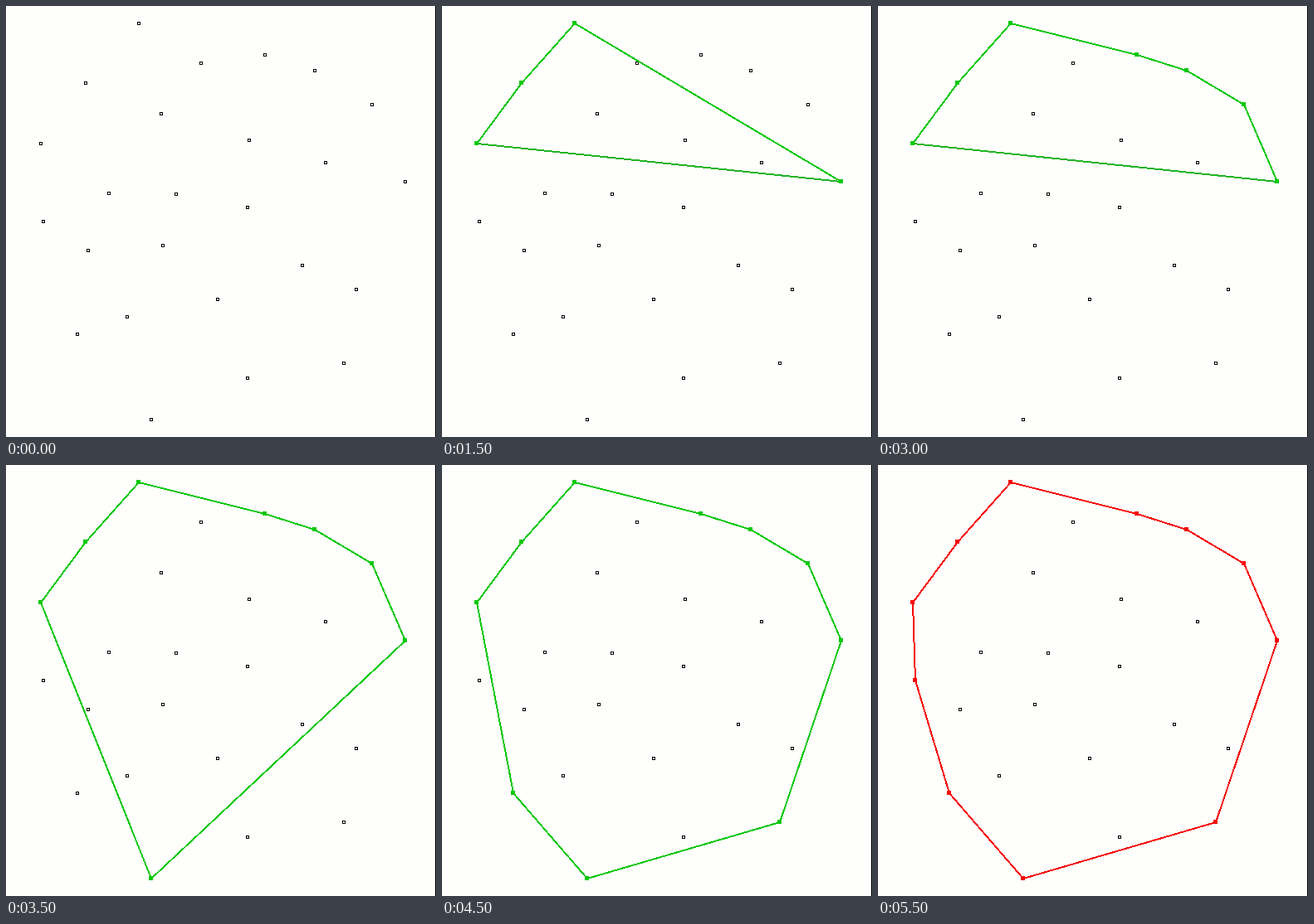
An HTML page for the animation above (6000 ms loop, 518x520 px).

```html
<!DOCTYPE html>
<html lang="en">
<head>
<meta charset="utf-8">
<title>Quickhull</title>
<style>
  html, body { margin: 0; width: 100%; height: 100%; overflow: hidden; background: #fefefd; }
  svg { display: block; width: 518px; height: 520px; shape-rendering: crispEdges; fill: none; }
  .dot { stroke: #000; stroke-width: 1; }
  .step { stroke: #08c808; stroke-width: 2; opacity: 0; animation: show 6s step-end infinite; }
  .step .base { stroke: #20b424; }
  .step.done { stroke: #f80404; }
  @keyframes show {
    0% { opacity: 1; }
    8.33333% { opacity: 0; }
    100% { opacity: 0; }
  }
</style>
</head>
<body>
<svg id="stage" viewBox="0 0 518 520">
  <rect x="517" width="1" height="520" fill="#000"/>
</svg>
<script>
  const stage = document.getElementById('stage');

  // Named points end up on the hull; the others stay inside.
  const hull = {
    left: [42, 166], upperLeft: [96, 93], top: [160, 21], ridge: [312, 59],
    shoulder: [372, 78], upperRight: [441, 119], right: [481, 212],
    lowerRight: [407, 431], bottom: [175, 499], lowerLeft: [86, 396], side: [45, 260]
  };
  const inner = [
    [235, 69], [187, 130], [293, 162], [385, 189], [124, 226], [205, 227], [291, 243],
    [99, 295], [189, 289], [357, 313], [422, 342], [255, 354], [146, 375], [291, 449]
  ];

  function add(parent, tag, attrs) {
    const el = document.createElementNS('http://www.w3.org/2000/svg', tag);
    for (const key in attrs) el.setAttribute(key, attrs[key]);
    return parent.appendChild(el);
  }

  for (const [x, y] of [...Object.values(hull), ...inner]) {
    add(stage, 'rect', { class: 'dot', x: x - 1.5, y: y - 1.5, width: 3, height: 3 });
  }

  function drawStep(chain, slot, closed, done) {
    const g = add(stage, 'g', { class: done ? 'step done' : 'step' });
    g.style.animationDelay = slot * 0.5 + 's';
    const { left, right } = hull;
    if (!closed) add(g, 'path', { class: 'base', d: `M${left}L${right}` });
    const pts = chain.map(name => hull[name]);
    if (pts.length > 2) add(g, 'path', { d: 'M' + pts.join('L') + (closed ? 'Z' : '') });
    for (const [x, y] of pts) {
      add(g, 'rect', { x: x - 2, y: y - 2, width: 3, height: 3 });
    }
  }

  // Each step inserts one point after the given neighbour.
  const inserts = [
    ['top', 'left'], ['upperLeft', 'left'], ['upperRight', 'top'], ['shoulder', 'top'],
    ['ridge', 'top'], ['bottom', 'right'], ['lowerRight', 'right'],
    ['lowerLeft', 'bottom'], ['side', 'lowerLeft']
  ];
  const chain = ['left', 'right'];
  drawStep(chain, 1, false);
  inserts.forEach(([name, after], i) => {
    chain.splice(chain.indexOf(after) + 1, 0, name);
    drawStep(chain, i + 2, chain.includes('bottom'));
  });
  drawStep(chain, 11, true, true);
</script>
</body>
</html>
```
